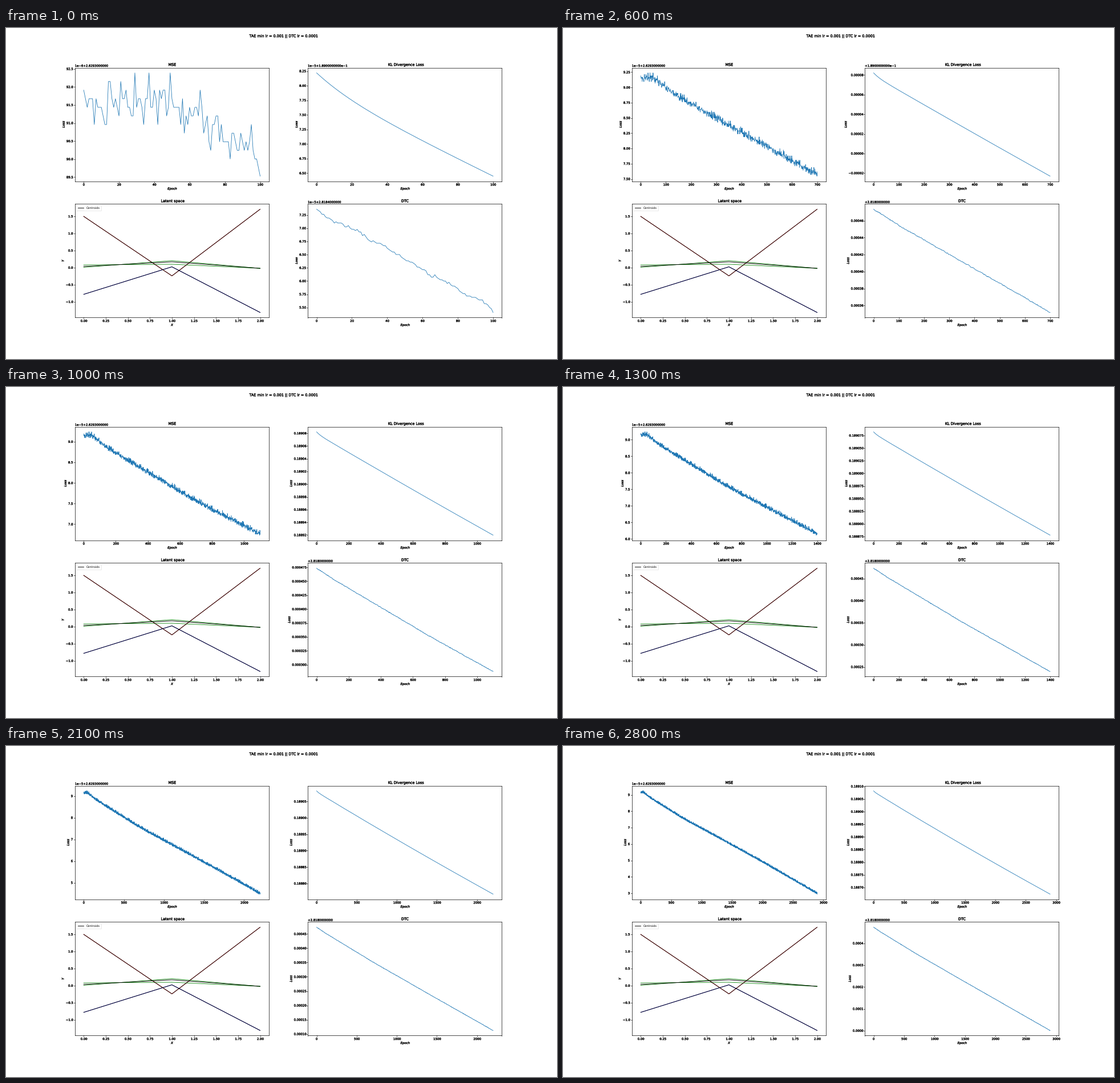
A matplotlib script that plays this animation: 966x580 px, repeating every 2.9 s.

```python
import numpy as np
import matplotlib.pyplot as plt
import matplotlib.patheffects as pe
from matplotlib.animation import FuncAnimation
from matplotlib.ticker import ScalarFormatter

DPI = 38.64
W, H = 966, 580
FRAMES, INTERVAL, STEP = 29, 100, 100
QUANTUM = 0.02384  # float32 resolution near 2.6, in units of 1e-5

plt.rcParams.update({
    "font.family": "DejaVu Sans",
    "font.size": 10,
    "text.hinting": "none",
    "text.hinting_factor": 1,
    "axes.linewidth": 1.3,
    "xtick.major.width": 1.4,
    "ytick.major.width": 1.4,
})
HEAVY = [pe.withStroke(linewidth=0.6, foreground="black")]

rng = np.random.default_rng(7)
epochs = np.arange(FRAMES * STEP + 1)


def quantised(top, knots, noise):
    """Piecewise linear trend plus noise, in whole quanta below the top."""
    trend = np.interp(epochs, *zip(*knots))
    return top - QUANTUM * np.round((top - trend - noise) / QUANTUM)


def spiky_noise(scale, low, high):
    """Laplace noise, with the same spread in every hundred epochs."""
    p = (np.arange(STEP) + 0.5) / STEP - 0.5
    spread = -scale * np.sign(p) * np.log(1 - 2 * np.abs(p))
    blocks = [rng.permutation(spread) for _ in range(FRAMES + 1)]
    return np.clip(np.concatenate(blocks)[:epochs.size], low, high)


def drifting_noise(sigma, decay):
    kernel = decay ** np.arange(20)
    return np.convolve(rng.normal(0, sigma, epochs.size), kernel)[:epochs.size]


mse = 2.6293 + 1e-5 * quantised(
    9.239,
    [(0, 9.16), (45, 9.16), (100, 9.01), (140, 8.87), (700, 7.57),
     (1400, 6.16), (2000, 4.93), (2900, 3.0)],
    spiky_noise(0.026, -0.055, 0.085))

dtc = 2.818 + 1e-5 * quantised(
    47.36,
    [(0, 47.36), (100, 45.45), (700, 35.2), (1400, 23.95), (2900, 0.1)],
    drifting_noise(0.018, 0.8))

kl = 0.189 + 1e-5 * (7.93 - 0.01488 * epochs + 3.8e-7 * epochs**2
                     - 2.6e-11 * epochs**3.0 + 0.29 * np.exp(-epochs / 22))


class LongOffset(ScalarFormatter):
    """Scalar formatter whose offset keeps ten decimals."""

    def get_offset(self):
        text = ""
        if self.orderOfMagnitude:
            text += f"1e{self.orderOfMagnitude}"
        if self.offset:
            digits, power = f"{self.offset:+.10e}".split("e")
            text += digits + (f"e{int(power)}" if int(power) else "")
        return text.replace("-", "\N{MINUS SIGN}")


fig, axes = plt.subplots(2, 2, figsize=(W / DPI, H / DPI), dpi=DPI)
fig.subplots_adjust(left=0.125, right=0.9, bottom=0.125, top=0.88,
                    wspace=0.2, hspace=0.2)
fig.suptitle("TAE min lr = 0.001 || DTC lr = 0.0001", fontsize=12,
             path_effects=HEAVY)


def label(ax, title, xlabel, ylabel):
    ax.set_title(title, path_effects=HEAVY)
    ax.set_xlabel(xlabel, style="italic", path_effects=HEAVY)
    ax.set_ylabel(ylabel, style="italic", path_effects=HEAVY)
    ax.yaxis.get_offset_text().set_path_effects(HEAVY)


def thicken_ticks(ax):
    for text in ax.get_xticklabels() + ax.get_yticklabels():
        text.set_path_effects(HEAVY)


def loss_plot(ax, title, data, offset):
    label(ax, title, "Epoch", "Loss")
    ax.yaxis.set_major_formatter(LongOffset())
    line, = ax.plot([], [], color="C0", lw=1.5)
    return ax, line, data, offset


def latent_plot(ax):
    label(ax, "Latent space", "X", "Y")
    x = [0, 1, 2]
    red, blue = [1.5, -0.24, 1.71], [-0.78, 0.025, -1.31]
    samples = [(red, "r"), (blue, "b"),
               ([0.08, 0.1, -0.02], "g"), ([0.01, 0.205, -0.02], "g")]
    for y, color in samples:
        ax.plot(x, y, color=color, lw=1.5)
    for y in (red, blue, [0.035, 0.17, -0.02]):
        centroid, = ax.plot(x, y, color="k", lw=1.7)
    ax.legend([centroid], ["Centroids"], loc="upper left")
    thicken_ticks(ax)


plots = [
    loss_plot(axes[0, 0], "MSE", mse, lambda n: 2.6293),
    loss_plot(axes[0, 1], "KL Divergence Loss", kl,
              lambda n: 0.189 if n <= 700 else False),
    loss_plot(axes[1, 1], "DTC", dtc,
              lambda n: 2.8184 if n <= 400 else 2.818),
]
latent_plot(axes[1, 0])


def update(i):
    n = STEP * (i + 1)
    for ax, line, data, offset in plots:
        line.set_data(epochs[:n + 1], data[:n + 1])
        ax.yaxis.get_major_formatter().set_useOffset(offset(n))
        ax.relim()
        ax.autoscale_view()
        thicken_ticks(ax)
    return [line for _, line, _, _ in plots]


anim = FuncAnimation(fig, update, frames=FRAMES, interval=INTERVAL,
                     init_func=lambda: update(0), repeat=True, blit=False)
plt.show()
```
